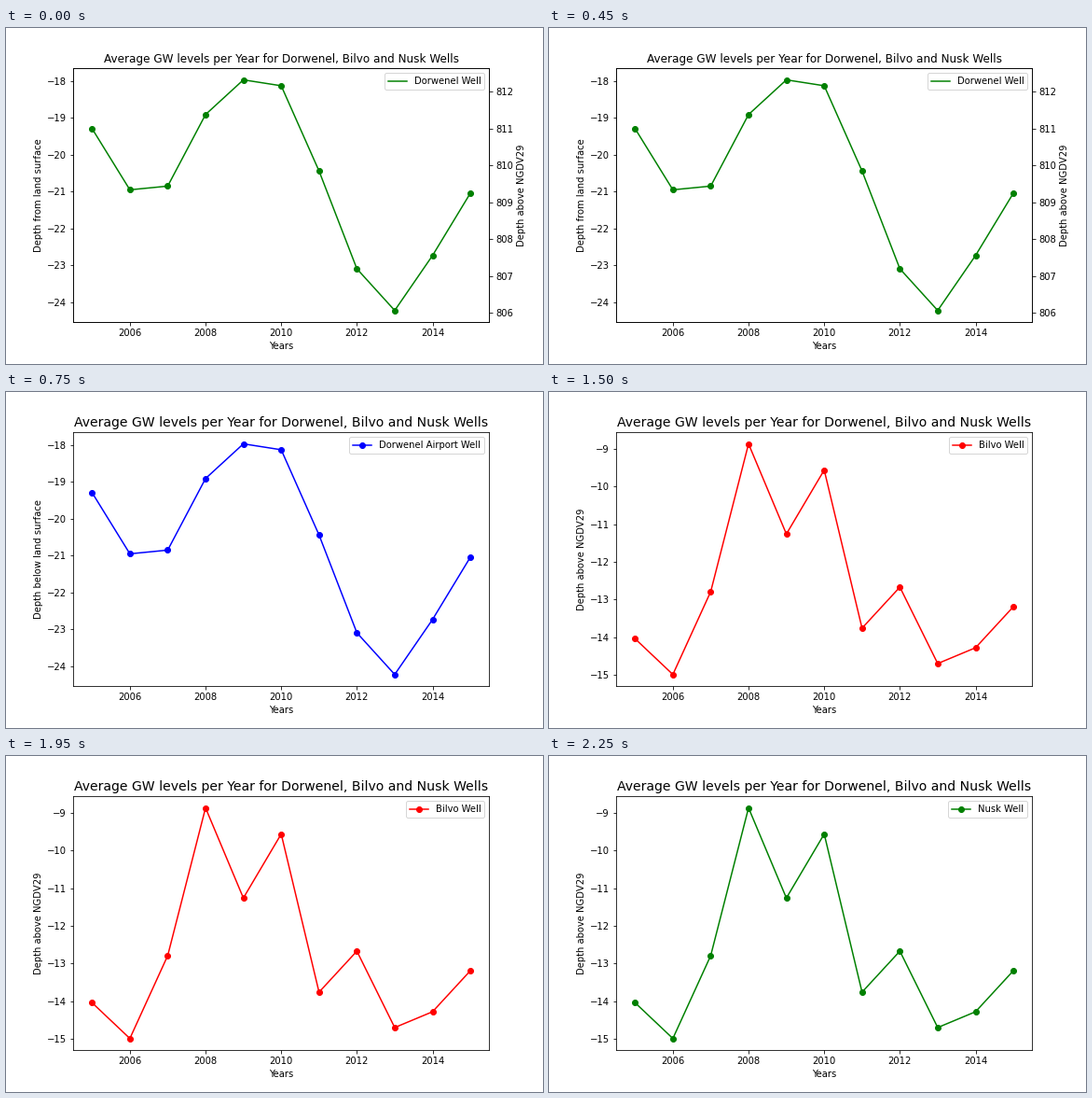
Recreate the animation shown at these times as a matplotlib script. Size 576 by 360 pixels, loop 3 s.

```python
import numpy as np
import matplotlib.pyplot as plt
from matplotlib.animation import FuncAnimation

plt.rcParams["font.family"] = "DejaVu Sans"
plt.rcParams["figure.subplot.bottom"] = 0.125

TITLE = "Average GW levels per Year for Dorwenel, Bilvo and Nusk Wells"
YEARS = np.arange(2005, 2016)
DEEP = np.array([-19.29, -20.95, -20.85, -18.91, -17.97, -18.13,
                 -20.44, -23.09, -24.22, -22.73, -21.04])
SHALLOW = np.array([-14.04, -14.99, -12.79, -8.865, -11.26, -9.56,
                    -13.76, -12.67, -14.70, -14.28, -13.19])
DATUM = 830.29

# levels, style, legend label, y label, title size
CHARTS = [
    (DEEP, "g-", "Dorwenel Well", "Depth from land surface", 12),
    (DEEP, "bo-", "Dorwenel Airport Well", "Depth below land surface", 14),
    (SHALLOW, "ro-", "Bilvo Well", "Depth above NGDV29", 14),
    (SHALLOW, "go-", "Nusk Well", "Depth above NGDV29", 14),
]

fig = plt.figure(figsize=(8, 5), dpi=72, facecolor="white")


def add_elevation_axis(ax, levels):
    right = ax.twinx()
    right.plot(YEARS, levels + DATUM, "go")
    right.set_yticks(range(806, 813))
    right.set_ylabel("Depth above NGDV29")


def draw(i):
    levels, style, label, ylabel, size = CHARTS[i % len(CHARTS)]
    fig.clear()
    ax = fig.add_subplot()
    ax.plot(YEARS, levels, style, label=label)
    ax.set_xticks(range(2006, 2015, 2))
    ax.set_yticks(np.arange(np.ceil(levels.min() - 0.1), levels.max()))
    ax.set_xlabel("Years")
    ax.set_ylabel(ylabel)
    ax.set_title(TITLE, fontsize=size)
    ax.legend(loc="upper right")
    if "o" not in style:
        add_elevation_axis(ax, levels)
    return []


anim = FuncAnimation(fig, draw, frames=len(CHARTS), init_func=lambda: draw(0),
                     interval=750, repeat=True, repeat_delay=0)
plt.show()
```
